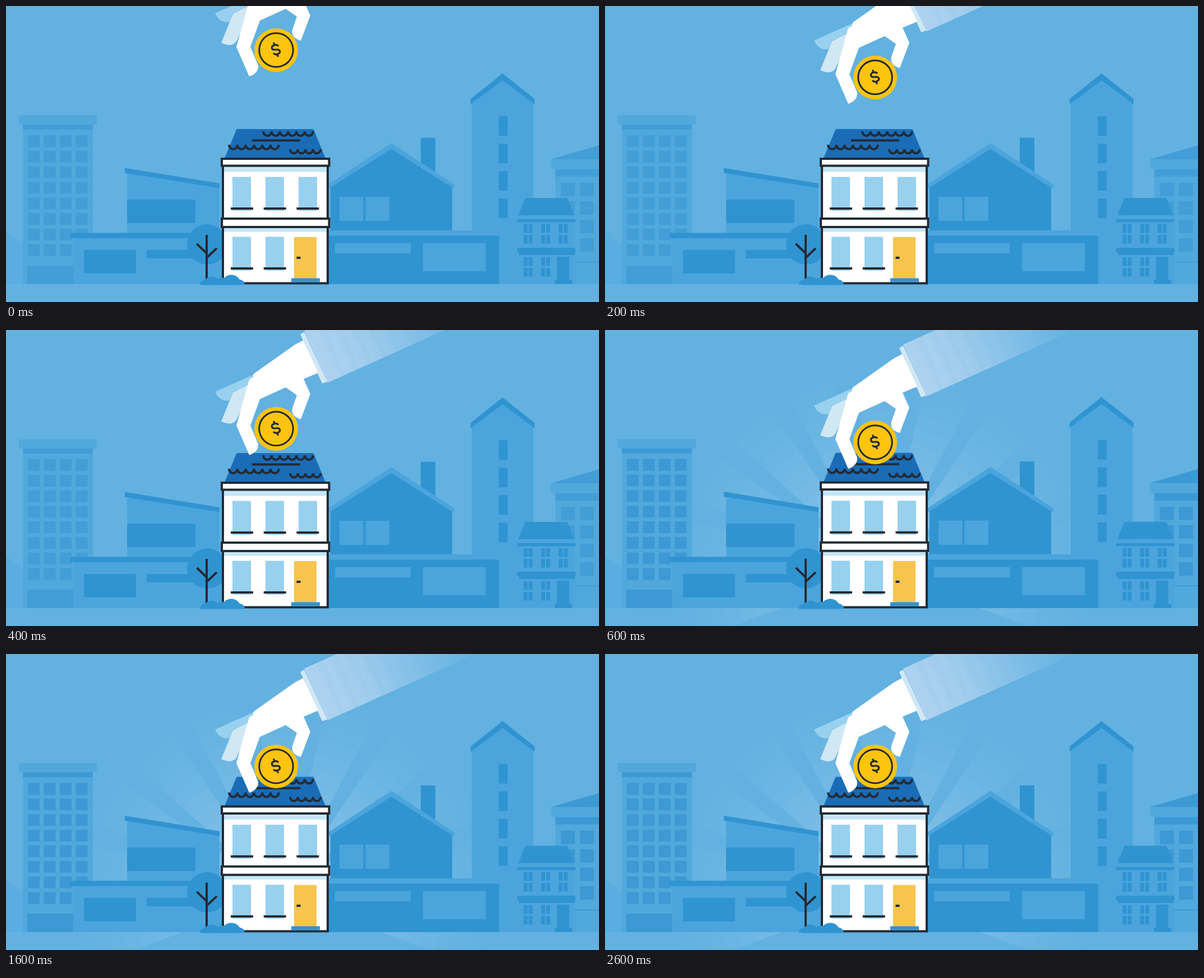
An HTML page with a canvas for the animation above (3.6 s loop, 1058x529 px).

```html
<!DOCTYPE html>
<html lang="en">
<head>
<meta charset="utf-8">
<title>Saving for a home</title>
<style>
html, body { margin: 0; width: 100%; height: 100%; overflow: hidden; background: #62b1e1; }
canvas { display: block; width: 100vw; height: 100vh; }
</style>
</head>
<body>
<canvas id="stage" width="1058" height="529"></canvas>
<script>
const ctx = document.getElementById('stage').getContext('2d');
const SKY = '#62b1e1', LIGHT = '#4ba5dc', DARK = '#3094d1', FAR = '#51a8dd', MIST = '#5aade0';
const INK = '#232a33', PANE = '#98d1ef', PALE = '#d0e8f4', GOLD = '#ffc40d';
const LOOP = 3600, STEP = 100, STEPS = 5, DROP = 24.4, BLINK = 500, GROUND = 497;
const rad = degrees => degrees * Math.PI / 180;

function box(color, x, y, w, h = GROUND - y) {
  ctx.fillStyle = color;
  ctx.fillRect(x, y, w, h);
}

// Equal boxes in columns and rows
function grid(color, x, y, w, h, cols, dx, rows = 1, dy = 0) {
  for (let r = 0; r < rows; r++)
    for (let c = 0; c < cols; c++) box(color, x + c * dx, y + r * dy, w, h);
}

function shape(color, d) {
  ctx.fillStyle = color;
  ctx.fill(new Path2D(d));
}

function stroke(d, width = 4) {
  ctx.strokeStyle = INK;
  ctx.lineWidth = width;
  ctx.stroke(new Path2D(d));
}

function disc(color, x, y, r) {
  ctx.fillStyle = color;
  ctx.beginPath();
  ctx.arc(x, y, r, 0, Math.PI * 2);
  ctx.fill();
}

function framed(x, y, w, h) {
  box('#fff', x, y, w, h);
  stroke(`M${x} ${y}h${w}v${h}h${-w}Z`);
}

function trapezoid(color, cx, top, bottom, topHalf, bottomHalf) {
  shape(color, `M${cx - topHalf} ${top}H${cx + topHalf}L${cx + bottomHalf} ${bottom}H${cx - bottomHalf}Z`);
}

// A pointed wall under a chevron roof
function gable(wall, roof, cx, top, half, rise, thick, inset, bottom) {
  const eave = top + rise;
  shape(wall, `M${cx} ${top + thick / 2}L${cx + half - inset} ${eave}V${bottom}H${cx - half + inset}V${eave}Z`);
  shape(roof, `M${cx} ${top}l${half} ${rise}v${thick * 0.75}L${cx} ${top + thick}L${cx - half} ${eave + thick * 0.75}v${-thick * 0.75}Z`);
}

// Wedges of light that brighten in rings towards the middle
function drawRays() {
  const pitch = rad(20.6), half = rad(7.2);
  for (let r = 370, ring = 0; r > 90; r -= 27, ring++) {
    ctx.fillStyle = `rgba(255,255,255,${0.012 + ring * 0.002})`;
    for (let i = -5; i <= 5; i++) {
      const a = i * pitch - Math.PI / 2;
      ctx.beginPath();
      ctx.moveTo(492, 432);
      ctx.arc(492, 432, r, a - half, a + half);
      ctx.fill();
    }
  }
}

function drawFarBuildings(shade) {
  shape(MIST, `M0 404L30 426V${GROUND}H0Z`);

  box(FAR, 30, 212, 125);
  box(FAR, 23, 195.5, 139, 16.5);
  box(shade, 30, 212, 125, 9);
  grid(shade, 39, 231, 21, 21, 4, 28.5, 8, 27.8);
  box(shade, 38, 464, 82);

  shape(shade, 'M972 274L1058 249V275Z');
  box(FAR, 980, 290, 78);
  box(FAR, 972, 274, 86, 17);
  box(shade, 980, 292, 78, 13);
  grid(shade, 990, 316, 25, 24, 2, 34, 4, 33);
  box(shade, 1014, 456.5, 44, 2);
}

function drawNearBuildings() {
  shape(LIGHT, 'M216 297L381 324V406H216Z');
  shape(DARK, 'M212 289.5L381 317V325.5L216 299H212Z');
  box(DARK, 216, 346, 122, 42);
  box(LIGHT, 120, 415, 265);
  box(DARK, 115, 405.5, 270, 9.5);
  box(DARK, 139, 436, 93, 42);
  box(DARK, 251, 436, 134, 15);

  gable(LIGHT, DARK, 886, 120.5, 57, 45.5, 12.5, 2, GROUND);
  grid(DARK, 879, 197, 16, 35, 1, 0, 4, 49);

  box(DARK, 740, 235.5, 26, 66);
  gable(DARK, LIGHT, 687.5, 245, 112.5, 74, 10.5, 4, 402);
  grid(LIGHT, 595, 341, 42.5, 43, 2, 46.5);
  box(LIGHT, 576, 401, 256, 10);
  box(DARK, 576, 410.5, 304);
  box(LIGHT, 587, 424, 135, 18);
  box(LIGHT, 744, 424, 112, 50);

  box(LIGHT, 916, 374, 99);
  trapezoid(DARK, 964, 343, 374, 37.5, 50);
  box(DARK, 912, 381, 104, 5.5);
  box(DARK, 912, 432, 104, 8);
  box(DARK, 915, 440, 100, 5);
  for (const pane of [0, 9]) {
    grid(DARK, 923.5 + pane, 390, 7, 15.5, 3, 31.3, 2, 19);
    grid(DARK, 923.5 + pane, 449, 7, 15.5, 2, 31.3, 2, 19);
  }
  box(DARK, 983, 448, 22);
  box(DARK, 979, 489, 31);
}

function scallops(x, y, count, pitch) {
  const r = pitch / 2;
  stroke(`M${x} ${y}` + `a${r} ${r + 0.5} 0 0 0 ${pitch} 0`.repeat(count));
}

function drawHouse() {
  disc(DARK, 359, 426, 36);
  stroke('M358 409V491M340.5 425L358 442M376 433L358 450');

  trapezoid('#1a6cb7', 480, 220, 272, 68.5, 90);
  scallops(459, 224, 6, 14.8);
  scallops(398, 248, 6, 14.8);
  scallops(507, 256, 4, 13.6);
  stroke('M439 240.3H525');

  framed(387, 286, 187, 209.5);
  for (let floor = 0; floor < 2; floor++) {
    const y = 273 + floor * 107, windows = 3 - floor;
    box('#c5e6f5', 389, y + 14, 183, 9.5);
    framed(385, y, 191.5, 12.5 + floor * 2.5);
    grid(PANE, 404, y + 32.5, 33, 60.5, windows, 59);
    grid(INK, 401, y + 87, 40, 4, windows, 58.7);
  }
  box('#f7c44e', 514, 413, 40, 74);
  box(INK, 518.5, 448, 7, 4);
  box(DARK, 509, 486.5, 51, 7.5);
  drawBush();
}

function drawBush() {
  ctx.save();
  ctx.beginPath();
  ctx.rect(340, 470, 90, 28.5);
  ctx.clip();
  for (const [x, r] of [[355, 9], [367, 14.5], [385, 12.5], [402, 17.5], [417, 9]]) disc(DARK, x, 498, r);
  ctx.restore();
}

function drawSleeve() {
  ctx.save();
  ctx.translate(532, 26);
  ctx.rotate(rad(-24.2));
  const fade = ctx.createLinearGradient(0, 0, 300, 0);
  fade.addColorStop(0, 'rgba(174,210,240,1)');
  fade.addColorStop(0.3, 'rgba(167,207,238,0.9)');
  fade.addColorStop(1, 'rgba(150,200,235,0)');
  box(fade, 0, 0, 310, 101.5);
  for (let i = 0; i < 10; i++) {
    trapezoid(`rgba(98,177,225,${0.08 - i * 0.006})`, 30 + i * 27, 0, 101.5, 8, 3);
  }
  ctx.restore();
  shape(PALE, 'M525 32L532 28L573 117L564 120Z');
}

function drawCoin() {
  disc(GOLD, 482, 201, 39);
  disc(INK, 482, 200.7, 31.8);
  disc(GOLD, 482, 200.7, 28.8);
  ctx.save();
  ctx.translate(481.5, 200);
  ctx.rotate(-0.3);
  stroke('M6 -4.5C5 -7.5 3 -8.5 0 -8.5C-4 -8.5 -6 -6.8 -6 -4.3C-6 -1 -3 -.5 0 0C3.5 .5 6 1.5 6 4.5C6 7 4 8.5 0 8.5C-3 8.5 -5 7.5 -6 4.5M0 -13.5V-8.5M0 8.5V13.5', 3.2);
  ctx.restore();
}

function drawHand() {
  shape(PANE, 'M373 135L442 104L432 125L405 135L399 150Q382 154 373 135Z');
  shape(PALE, 'M405 136L434 122L437 130L413 181Q407 198 384 188Z');
  drawSleeve();
  drawCoin();
  shape('#fff', 'M530 43L515 51L443 102Q440 105 441 109Q433 111 432 120L411 195L434 248Q451 242 450 228L436 195L453 148L499 127L519 141L511 164Q508 179 526 184L543 139L531 112L557 101Z');
}

function draw(now) {
  const t = now % LOOP;
  const step = Math.min(STEPS, Math.floor(t / STEP));
  const blink = Math.min(4, Math.floor((t - STEP) / BLINK));
  const glow = t >= 600 && (blink % 2 === 1 || blink === 4) && !(t >= 2100 && t < 2600);

  box(SKY, 0, 0, 1058, 529);
  if (glow) drawRays();
  ctx.save();
  if (glow) {
    // The lit scene stands a touch taller
    ctx.translate(0, GROUND);
    ctx.scale(1, 1.002);
    ctx.translate(0, -GROUND);
  }
  drawFarBuildings(glow ? '#3c99d4' : '#439dd7');
  drawNearBuildings();
  drawHouse();
  ctx.restore();

  ctx.save();
  ctx.translate(0, (step - STEPS) * DROP);
  drawHand();
  ctx.restore();
}

const start = performance.now();
function tick() {
  draw(performance.now() - start);
  requestAnimationFrame(tick);
}
tick();
</script>
</body>
</html>
```
